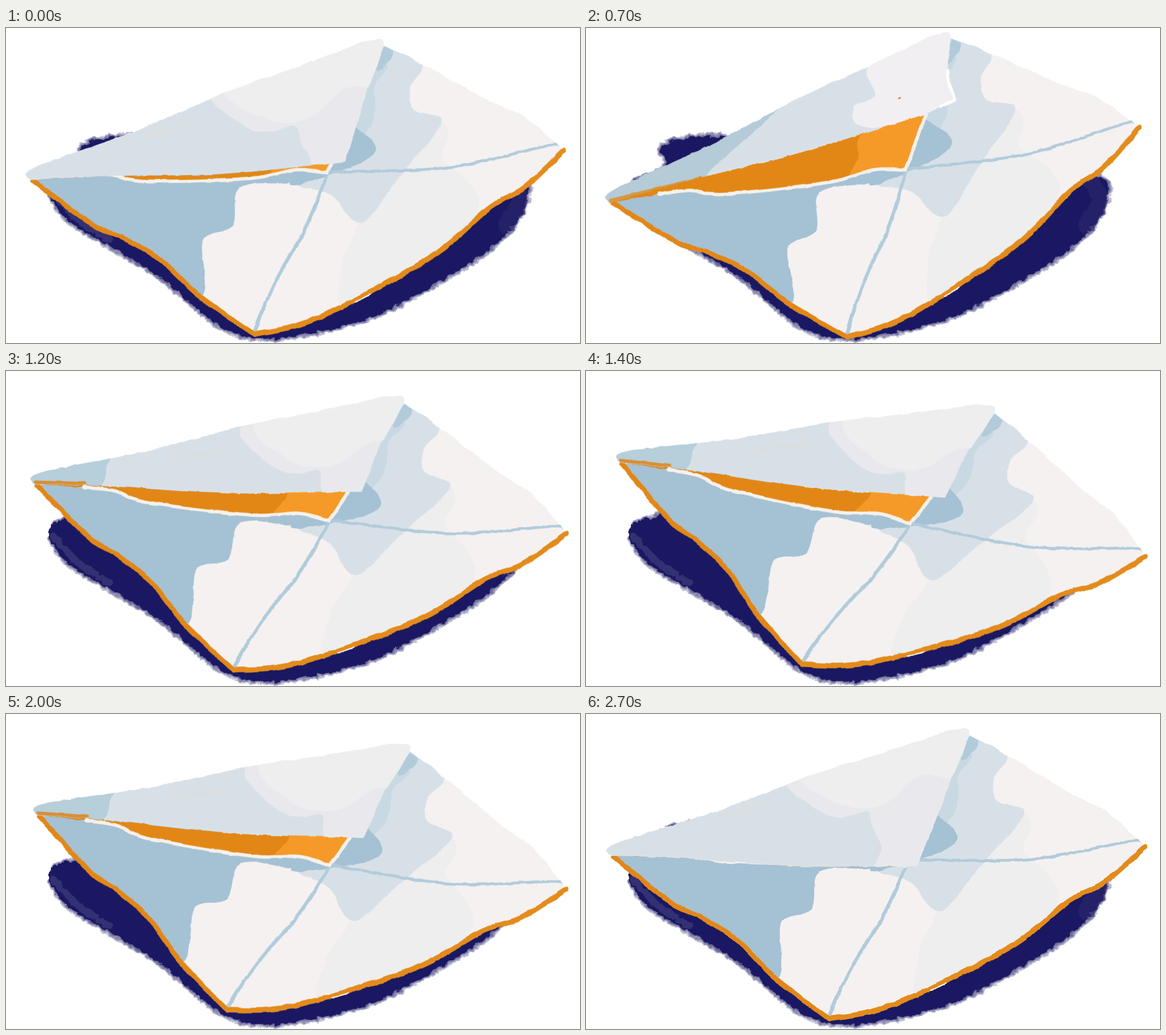
An HTML page that plays this animation: 1009x555 px, repeating every 2900 ms.

```html
<!DOCTYPE html>
<html lang="en">
<head>
<meta charset="utf-8">
<title>Rocking envelope</title>
<style>
html, body { margin: 0; width: 100%; height: 100%; overflow: hidden; background: #fff; }
svg { display: block; width: 100%; height: 100%; }
path { stroke-linejoin: round; stroke-linecap: round; }
</style>
</head>
<body>
<svg id="stage" viewBox="0 0 1009 555"></svg>
<script>
const navy = '#1a1862', blue = '#a5c1d4', mist = '#d8e0e7', paper = '#f5f1f1', grey = '#eeeeee',
      lilac = '#e9e9ed', orange = '#e28716', bright = '#f59a28', crease = '#b1cbdb', rim = '#f6f1ea';

// Smooth curve through a few key points
function curve(s, closed = false) {
  const p = s.split(' ').map(q => q.split(',').map(Number)), n = p.length;
  const at = i => p[closed ? (i + n) % n : Math.max(0, Math.min(n - 1, i))];
  const handle = (a, b, c) => [0, 1].map(k => a[k] + (c[k] - b[k]) / 6);
  let d = 'M' + p[0];
  for (let i = 0; i < (closed ? n : n - 1); i++) {
    const [a, b] = [at(i), at(i + 1)];
    d += `C${handle(a, at(i - 1), b)} ${handle(b, at(i + 2), a)} ${b}`;
  }
  return d;
}
const join = (...parts) => parts.map((s, i) => i ? curve(s).replace('M', 'L') : curve(s)).join('') + 'Z';
const reverse = s => s.split(' ').reverse().join(' ');
const fill = (d, color) => `<path d="${d}" fill="${color}"/>`;
const patch = (s, color) => fill(curve(s, true), color);
const stroke = (s, color, width, opacity = 1) =>
  `<path d="${curve(s)}" fill="none" stroke="${color}" stroke-width="${width}" opacity="${opacity}"/>`;
const clip = (id, d, color, inner) =>
  `<clipPath id="${id}"><path d="${d}"/></clipPath><g clip-path="url(#${id})">${fill(d, color)}${inner}</g>`;
const rough = (id, freq, scale, blur) =>
  `<filter id="${id}" filterUnits="userSpaceOnUse" x="-20" y="-40" width="1050" height="640" color-interpolation-filters="sRGB">
   <feTurbulence type="fractalNoise" baseFrequency="${freq}" numOctaves="3" seed="4"/>
   <feDisplacementMap in="SourceGraphic" scale="${scale}" xChannelSelector="R" yChannelSelector="G"/>
   <feGaussianBlur stdDeviation="${blur}"/></filter>`;

// Shadow on the ground, with a soft brushed rim
const ground = '86,268 130,253 141,234 131,210 190,192 300,200 700,270 888,259 916,300 866,377 735,463 620,517 470,547 380,528 275,442 180,383 110,340 76,294';
const shadow = [12, 8, 4].map(w => stroke(ground, navy, w, .28)).join('') + patch(ground, navy) +
  stroke('84,292 120,332 182,374', '#45427f', 12, .6) +
  stroke('890,275 902,305 880,345', '#29266c', 30, .7);

// Envelope body
const leftEdge = '49,252 150,333 200,357 265,398 330,463 427,537';
const rightEdge = '427,537 540,512 740,414 850,329 912,296 983,234';
const backEdge = '983,234 970,221 915,172 850,138 740,73 673,36';
const body = clip('body', join(leftEdge, rightEdge, backEdge), paper,
  patch('720,215 768,176 782,200 768,240 800,270 830,330 750,420 590,500 586,420 606,375 622,345 690,270', grey) +
  patch('600,60 690,30 740,73 716,115 724,154 770,176 690,272 622,348 570,296 500,265 560,180', mist) +
  patch('650,50 680,70 655,110 650,170 600,220', '#c9d9e3') +
  patch('664,40 688,42 685,62 660,80', crease) +
  patch('590,170 636,192 652,216 636,237 566,262 500,276 530,230', blue) +
  patch('30,240 300,225 560,256 500,272 430,272 404,288 395,345 342,370 334,470 200,470 20,300', blue) +
  stroke('566,260 525,350 465,450 427,532', crease, 6) +
  stroke('570,256 780,256 960,224 982,235', crease, 5) +
  stroke('390,511 424,533', navy, 4)) +
  stroke(leftEdge, orange, 8.5) + stroke(rightEdge, '#e38b1c', 9) +
  stroke('606,487 632,475', '#fff', 2);

// Flap: `rise` lifts its lower edge, `nose` is its free corner
const topEdge = '40,246 55,227 230,171 400,107 520,69 655,26 674,38';
const fold = '130,246 185,246 250,260 430,262 510,250 566,257';
function pose(rise, nose, paint, trim = '') {
  const tipY = 268 - rise, tip = `${566 + (257 - tipY) / 2},${tipY}`;
  const lower = `${tip} 380,${269 - .62 * rise} 180,${255 - .25 * rise} 46,250`;
  const side = `674,38 ${(674 + nose[0]) / 2 - .09 * rise},${(38 + nose[1]) / 2} ${nose}`;
  return clip('liner' + rise, join(reverse(lower), reverse(fold)), orange,
      patch('505,180 640,130 620,280 475,270 485,225', bright)) +
    stroke(fold, rim, 6) + stroke(`566,257 ${tip}`, rim, 6) +
    clip('flap' + rise, join(topEdge, side, lower), mist, paint) + trim;
}
const folded = rise => `<g transform="translate(${rise * .65})">` +
  patch('360,100 400,165 450,182 495,172 505,205 520,235 508,290 620,300 720,60 600,0', lilac) +
  patch('385,90 440,157 520,160 590,108 680,110 700,0', grey) +
  stroke('230,183 320,155', '#dcdedd', 7, .8) + '</g>';

const poses = [
  pose(0, [582, 268], folded(0)),
  pose(27, [598, 239], folded(27)),
  pose(65, [617, 200], folded(65) + patch('20,190 160,180 165,205 150,245 20,270', '#b7cedb'),
    stroke('46,246 130,239', '#d98f35', 6)),
  pose(104, [667, 145],
    patch('20,200 370,100 340,135 230,212 190,245 20,260', '#b5cbd7') +
    patch('530,60 680,0 690,160 610,178 500,172 490,135 528,120', '#f2eff2'),
    stroke('661,92 661,120 667,145', '#fff', 5) + stroke('667,145 640,154', '#fff', 5) +
    stroke('570,130 572,129', '#c9782c', 2) + stroke('46,247 205,228', orange, 8, .75))
];

stage.innerHTML = rough('grain', .04, 5, 0) + rough('brush', .09, 11, .7) +
  `<g filter="url(#brush)">${shadow}</g><g id="letter" filter="url(#grain)">${body}` +
  poses.map(p => `<g class="pose">${p}</g>`).join('') + '</g>';
const letter = document.getElementById('letter');
const poseNodes = document.querySelectorAll('.pose');

const loop = 2900, step = 100;
const swing = [[-250, 0], [500, -8.8], [1640, 13.5], [1740, 13.5], [2400, 0], [2900, 0]];
const poseAt = [[0, 1], [100, 2], [300, 3], [1200, 2], [2500, 1], [2600, 0]];

function angleAt(t) {
  const i = swing.findIndex(k => t < k[0]);
  const [t0, a0] = swing[i - 1], [t1, a1] = swing[i];
  return a0 + (a1 - a0) * (1 - Math.cos(Math.PI * (t - t0) / (t1 - t0))) / 2;
}

let start, last = -1;
function draw(now) {
  start ??= now;
  const t = Math.min(Math.floor(Math.max(0, now - start) % loop / step) * step, 2700);
  if (t !== last) {
    last = t;
    letter.setAttribute('transform', `rotate(${angleAt(t)} 506 284)`);
    const pose = poseAt.findLast(k => t >= k[0])[1];
    poseNodes.forEach((n, i) => n.style.display = i === pose ? '' : 'none');
  }
  requestAnimationFrame(draw);
}
draw(performance.now());
</script>
</body>
</html>
```
